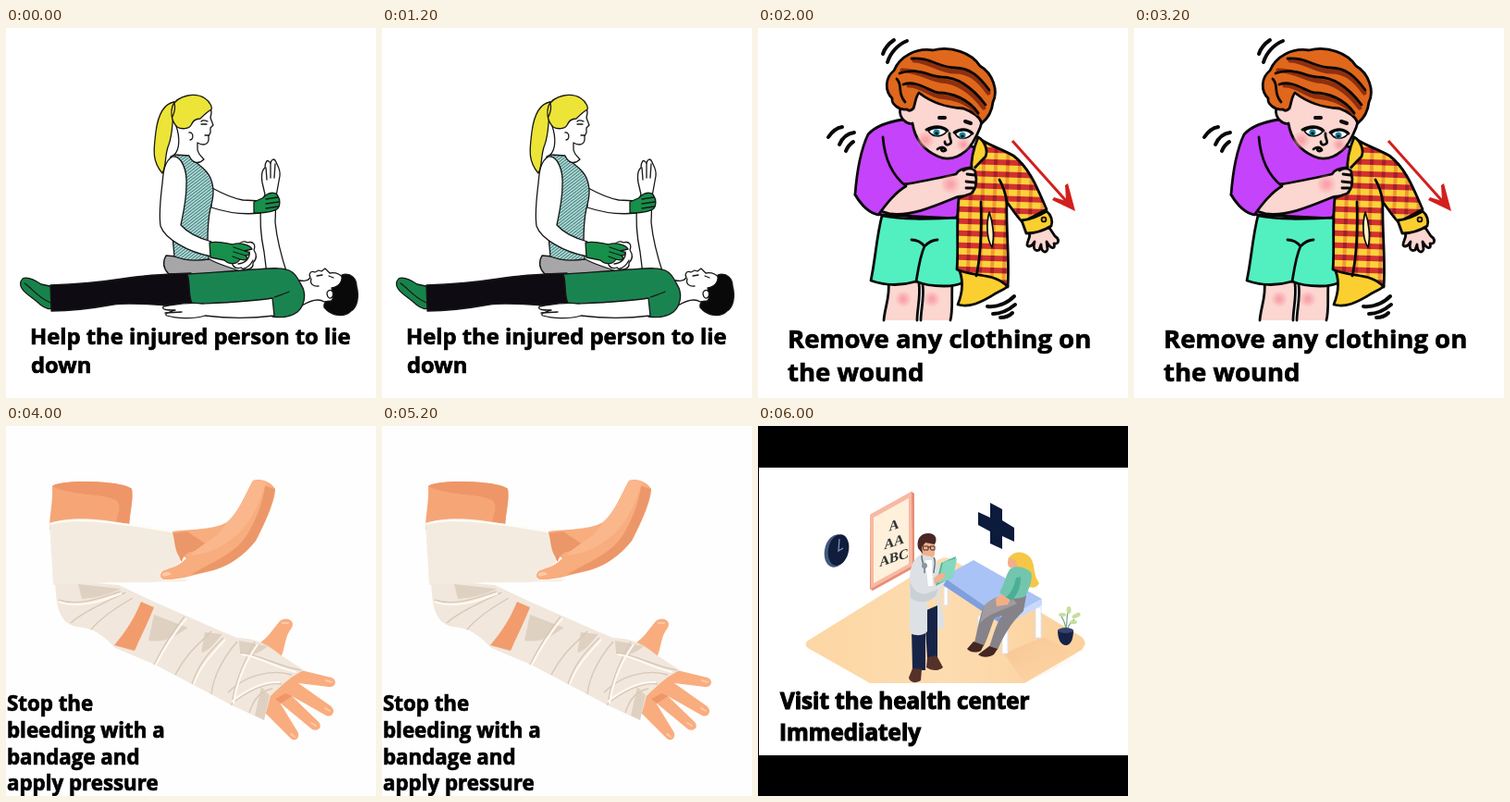
An HTML page that plays this animation: 400 by 400 pixels, repeating every 8 s.

```html
<!DOCTYPE html>
<html lang="en">
<head>
<meta charset="utf-8">
<title>First aid steps</title>
<style>
html, body { margin: 0; width: 100%; height: 100%; overflow: hidden; background: #fff; }
svg { display: block; width: 100vw; height: 100vh; }
text { font-family: "Open Sans", "Noto Sans", sans-serif; font-weight: 700; fill: #000; stroke: #000; stroke-width: .7; }
.heavy text { stroke-width: 1.1; }
.ink { stroke: #161616; stroke-width: 1.3; stroke-linejoin: round; stroke-linecap: round; }
.bold { stroke: #080808; stroke-width: 2.8; stroke-linejoin: round; stroke-linecap: round; }
.line { fill: none; }
.thin { stroke-width: 1.7; }
.thick { stroke-width: 4; }
.bare { stroke: none; }
.scene { display: none; }
.chart text { font-family: "Liberation Serif", "Noto Serif", serif; font-size: 15px; fill: #333; stroke: none; text-anchor: middle; }
</style>
</head>
<body>
<svg viewBox="0 0 400 400">
<defs>
  <pattern id="stripe" width="2.6" height="2.6" patternUnits="userSpaceOnUse" patternTransform="rotate(-38)">
    <rect width="2.6" height="2.6" fill="#cfe6e2"/><rect width="2.6" height="1.2" fill="#35817f"/>
  </pattern>
  <pattern id="plaid" width="13" height="13" patternUnits="userSpaceOnUse" patternTransform="rotate(2)">
    <rect width="13" height="13" fill="#fbd23a"/>
    <rect width="4" height="13" fill="#ee9a2f"/>
    <rect y="3" width="13" height="6" fill="#d3312f"/>
    <rect y="3" width="4" height="6" fill="#a31f2b"/>
  </pattern>
  <radialGradient id="blush"><stop offset=".2" stop-color="#f9a3aa"/><stop offset="1" stop-color="#f9a3aa" stop-opacity="0"/></radialGradient>
  <linearGradient id="floor" x1="0" y1="0" x2="1" y2="0">
    <stop offset="0" stop-color="#fdd6a3"/><stop offset=".5" stop-color="#fddcb0"/><stop offset="1" stop-color="#fbd09c"/>
  </linearGradient>
  <linearGradient id="shade" x1="0" y1="0" x2="1" y2=".6">
    <stop offset="0" stop-color="#f3b079"/><stop offset="1" stop-color="#f9c797" stop-opacity="0"/>
  </linearGradient>
</defs>

<!-- Lying down -->
<g class="scene">
  <g class="ink" fill="#fff">
    <path fill="#a6a6a8" d="M173 246C169 253 170 260 176 266H258C250 260 234 258 220 250Z"/>
    <path d="M221 172C232 178 244 184 256 186L276 187L275 200C258 202 240 200 222 194Z"/>
    <path fill="url(#stripe)" d="M178 139C186 134 194 134 199 138C204 147 216 150 221 162C226 174 224 184 221 195C218 208 218 220 218 232L219 250C206 252 192 251 182 247L174 160Z"/>
    <path fill="#ece436" d="M182 80C169 82 164 97 162 112C160 130 157 143 169 157C174 148 171 138 176 126C181 112 179 100 182 90Z"/>
    <path d="M200 76C214 74 222 84 222 92L221 97L224 105L221 108L221 113L219 117V121C218 127 212 127 207 124L207 128C206 134 210 138 214 142C208 148 201 146 198 138L182 137C188 131 188 118 184 106Z"/>
    <path fill="#ece436" d="M180 84C186 73 204 69 215 76C221 80 223 86 222 88C217 91 213 95 210 98C205 98 202 100 200 105C198 109 190 110 185 107C178 100 178 90 180 84Z"/>
    <path class="line" d="M181 80C184 84 182 92 180 96M198 113C203 112 203 121 199 121M211 104L217 104M211 101C213 99 216 100 218 101M215 116L219 116"/>
    <path d="M180 139C171 144 170 156 169 168C167 184 165 200 167 214C172 228 196 242 222 247L222 231C208 227 196 221 189 213C192 198 195 186 195 170C196 154 190 138 180 139Z"/>
    <path d="M276 190C274 208 276 228 279 242L282 266H304C298 248 293 230 291 210L292 182L296 160C297 153 294 150 292 145C290 140 287 142 286 146C282 140 280 146 280 151C276 154 276 162 277 167L280 180Z"/>
    <path class="line" d="M286 146L286 162M281 151L282 164M291 147L290 162"/>
    <path fill="#16904a" d="M268 188L277 184L282 180C287 177 293 178 294 182C297 186 296 192 294 195C288 200 280 199 274 200L268 200Z"/>
    <path class="line" d="M281 185L294 183M281 190L295 188M281 195L294 193"/>
    <path d="M249 238C253 230 258 230 261 232C268 230 270 235 268 240C272 246 270 251 267 254C268 261 258 263 254 259C245 262 242 252 246 248Z"/>
    <path class="line" d="M251 255C259 254 264 249 263 242M257 260C264 258 265 254 267 251"/>
    <path fill="#16904a" d="M220 232C231 230 238 233 245 234C253 231 264 235 266 239L258 241C264 242 265 245 259 246C263 250 259 252 253 250C249 257 240 255 236 251L221 248Z"/>
    <path class="line" d="M246 237L258 241M246 242L259 246M245 247L253 250"/>
  </g>
  <g class="ink" fill="#fff">
    <path fill="#17834b" d="M18 271C24 268 32 273 38 277L52 280L51 301C49 306 42 303 37 299C28 290 13 284 16 274Z"/>
    <path class="line" d="M20 276C29 282 34 291 48 297"/>
    <path fill="#0e0b12" d="M48 278C75 277 100 275 126 271C150 267 172 266 200 265L201 300C170 301 140 296 116 299C94 303 72 306 49 306Z"/>
    <path d="M308 272C318 272 324 276 329 270C327 266 329 262 334 264L338 262L341 263L345 260L350 265C356 264 361 266 364 270L362 294L344 296C338 292 330 294 320 300Z"/>
    <path fill="#090909" d="M363 267C373 264 379 271 379 279C382 290 380 302 373 306C366 313 352 312 344 302C343 297 347 294 351 296C355 293 354 287 352 281C358 280 364 276 363 267Z"/>
    <path d="M347 286C350 281 355 284 353 290C351 294 347 292 347 286Z"/>
    <path class="line" d="M336 268L342 267M349 268L354 270M330 271C328 277 333 280 338 279"/>
    <path fill="#1a8451" d="M196 266C222 264 246 263 268 261C284 260 300 258 308 263C315 267 316 273 321 281C324 289 323 300 315 307C306 314 295 313 288 312L286 296C258 296 230 302 202 299C196 290 200 277 196 266Z"/>
    <path d="M288 292C264 296 236 297 212 298C198 296 184 299 170 301C168 305 175 305 183 305C176 307 170 309 174 311C184 314 202 315 215 311C240 314 266 314 290 311Z"/>
    <path class="line" d="M172 308L190 307M290 291C298 288 302 287 306 285"/>
  </g>
  <g font-size="23.8"><text x="26" y="342">Help the injured person to lie</text><text x="27" y="373">down</text></g>
</g>

<!-- Taking the jacket off -->
<g class="scene">
  <g class="bold" fill="#fcd6d0">
    <path class="line thick" d="M147 13C141 17 137 22 135 28M161 14C151 18 143 27 140 37M76 118C80 112 85 108 91 107M88 126C91 119 97 114 104 113M95 133C97 128 100 125 103 123M248 301C258 302 269 298 277 290M254 309C264 309 272 304 278 299M262 313C268 313 272 311 275 308"/>
    <path class="bare" d="M141 273C143 288 137 302 136 316H172C172 303 176 290 174 273ZM178 273C180 290 176 304 176 316H208C212 300 209 288 211 272Z"/>
    <path class="line" d="M141 275C143 290 137 302 136 316M174 276C176 290 172 304 172 316M178 277C180 292 176 304 176 316M210 277C209 290 211 304 208 316"/>
    <path fill="#c543fa" d="M157 99C143 101 128 105 119 115C111 132 107 153 105 180C112 192 122 201 134 202L214 206L236 160L236 130Z"/>
    <path fill="#52efc0" d="M134 203C160 208 190 206 216 205L228 264C228 276 216 279 201 279C190 279 180 278 171 274C154 279 136 278 122 273C127 250 128 226 134 203Z"/>
    <path class="line" d="M166 229C171 229 176 231 180 236C175 247 173 262 171 274M180 236C184 232 190 229 194 229"/>
    <path d="M130 197C136 185 145 174 158 169C178 166 196 162 214 158C218 151 226 152 234 150L233 178C227 184 218 180 212 184C190 193 164 204 143 201Z"/>
    <path class="bare" fill="#c543fa" d="M105 180C112 192 121 200 130 202C139 190 148 178 160 171C151 162 143 148 142 129C132 142 118 170 105 180Z"/>
    <path class="line" d="M105 180C112 192 121 200 130 202C139 190 148 178 160 171M135 118C137 143 146 160 160 171"/>
    <path fill="#fbcf2f" d="M216 258C222 270 222 284 216 299C230 303 243 295 252 290C260 284 267 283 270 279L262 266Z"/>
    <path d="M292 219C297 224 290 231 291 235C294 238 297 234 299 231C297 238 299 242 304 240L306 234C306 243 312 244 313 239L312 231C317 240 322 239 320 233C326 234 326 228 321 225L315 216Z"/>
    <path fill="url(#plaid)" d="M238 119C250 127 264 131 276 138C294 151 303 176 312 196L286 210C280 204 275 196 269 188C268 218 272 248 270 280C256 264 234 270 215 261C217 236 214 210 217 184L232 178L232 148Z"/>
    <path class="line" d="M269 189C268 180 265 171 261 164M236 268C240 250 242 220 241 188"/>
    <path class="thin" fill="#fff3c7" d="M250 199C246 214 248 230 253 237C256 226 254 210 250 199Z"/>
    <path fill="#fbcf2f" d="M238 118C245 122 249 132 246 139C241 144 236 149 231 155C230 145 233 130 238 118Z"/>
    <path fill="#fbcf2f" d="M285 208C295 207 304 203 312 198C317 202 319 209 317 214C309 219 300 222 290 222Z"/>
    <circle class="thin" cx="309" cy="207" r="2.5" fill="#e8a51e"/>
    <path class="bare" d="M219 160C222 151 230 151 234 151C237 156 235 162 234 167C236 176 230 180 223 178C216 180 215 172 218 168Z"/>
    <path class="line" d="M222 154C228 150 236 152 235 158C237 164 236 174 231 178M226 158L234 159M225 166L234 167M225 173L232 173"/>
  </g>
  <g class="bold" fill="#fcd6d0">
    <path d="M162 80C152 78 151 94 158 100C161 103 164 104 167 103C170 122 181 133 195 139C208 145 223 138 232 124C238 114 243 104 243 94L218 58L166 59Z"/>
    <path fill="#e0671b" d="M161 88C152 89 144 82 145 76C137 68 137 54 147 46C153 31 171 21 189 24C209 19 231 27 240 41C254 49 260 68 254 80C253 90 248 98 242 103C239 94 230 90 222 87C204 86 188 81 174 70C170 75 170 82 168 87C165 90 163 90 161 88Z"/>
    <g class="line" style="stroke:#8e2f0e;stroke-width:5">
      <path d="M156 46C171 45 185 55 198 57C214 58 230 67 244 86M169 35C184 35 197 47 213 47C229 47 239 56 249 70M163 62C174 61 184 71 196 74C212 75 227 80 237 92"/>
    </g>
    <path class="line" d="M153 49C171 42 185 52 198 53C215 53 230 62 246 83M166 33C185 31 196 43 213 43C229 43 239 52 250 67M157 61C171 56 183 67 195 70C210 70 228 77 238 92M150 55C157 62 150 70 159 80"/>
    <path class="line thick" d="M196 97L202 97M224 101L230 103"/>
    <path class="thin" fill="#fff" d="M184 111C190 107 200 107 204 112C198 119 188 118 184 111ZM213 114C219 109 228 110 231 115C225 121 217 121 213 114Z"/>
    <path class="line" d="M182 110C190 105 200 106 205 111M212 113C219 108 227 109 232 114M207 114C206 120 212 124 206 126C203 127 202 125 202 123M194 131C198 128 202 129 203 132C200 134 197 133 199 129"/>
  </g>
  <g fill="#1887a5"><circle cx="193" cy="113" r="3.500"/><circle cx="221" cy="116" r="3.500"/></g>
  <g fill="#081620"><circle cx="193" cy="114" r="1.800"/><circle cx="221" cy="117" r="1.800"/></g>
  <g fill="url(#blush)">
    <circle cx="181" cy="121" r="10"/><circle cx="222" cy="126" r="8"/><circle cx="208" cy="169" r="11"/>
    <circle cx="157" cy="293" r="9"/><circle cx="188" cy="293" r="9"/>
  </g>
  <path d="M275 122L335 189" fill="none" stroke="#d2201d" stroke-width="3"/>
  <path d="M343 198L318 186L320 183L333 187L332 170L335 168Z" fill="#d2201d"/>
  <g font-size="27.5"><text x="32" y="346">Remove any clothing on</text><text x="32" y="382">the wound</text></g>
</g>

<!-- Bandaging -->
<g class="scene">
  <rect width="400" height="400" fill="#fefefe"/>
  <path fill="#f6a577" d="M50 65C60 57 126 59 136 68C138 80 134 91 133 109L47 112C47 96 51 81 50 65Z"/>
  <path fill="#ee9668" d="M50 65C60 57 126 59 136 68C138 80 134 91 133 109L119 108C119 96 127 87 119 80C102 72 71 76 50 65Z"/>
  <path fill="#f9ad7f" d="M268 238C280 234 288 220 296 211C304 205 313 211 309 218C300 229 303 240 296 252L319 264L352 272C359 275 356 283 349 282L316 278L350 302C358 307 353 316 346 313L309 292L336 318C344 324 338 331 331 328L296 299L315 330C319 336 313 343 307 337L276 306Z"/>
  <path fill="#ee9668" d="M309 292L302 289L291 295L297 300Z"/>
  <path fill="none" stroke="#ffc9a8" stroke-width="2" stroke-linecap="round" d="M346 275L352 277M345 305L350 308M330 321L335 324M308 333L312 336M299 213L305 213"/>
  <path fill="#f1e7dc" d="M53 166L122 172L160 190L233 222L250 229C270 229 286 238 296 247L322 264C309 270 298 280 286 292L279 318L244 302L220 289L161 258L118 240C104 225 94 218 76 217C59 213 54 199 53 166Z"/>
  <path fill="#f29c6d" d="M146 190L160 196C154 211 146 227 139 243L117 237C130 222 139 207 146 190Z"/>
  <path fill="#dfd1c1" d="M78 171L124 176C110 183 96 186 82 187ZM160 204L197 218C184 226 174 235 154 232ZM215 223L234 225C224 236 220 243 211 245ZM252 232L283 238C270 249 259 250 253 245ZM276 282L285 291L279 318L269 313Z"/>
  <path fill="none" stroke="#d8c8b7" stroke-width="1.4" d="M57 188C80 196 106 184 124 179M70 213C82 202 108 190 129 180M92 220C103 207 121 195 137 186M160 258C170 238 180 222 193 206M183 269C194 247 206 238 222 222M201 279C208 258 217 247 235 229M222 290C224 270 236 249 250 233M244 302C246 284 254 260 269 233M253 245C274 247 294 260 319 264M240 288C258 270 286 262 309 269M244 300C260 287 282 276 298 279M263 310C267 297 275 286 288 284"/>
  <path fill="none" stroke="#fffaf3" stroke-width="2" d="M57 190C80 198 107 188 125 181M162 258C172 239 181 224 195 208M203 279C210 260 221 248 237 231M246 300C249 280 258 256 272 236M255 247C274 249 292 262 314 266M244 298C260 285 278 276 296 277"/>
  <path fill="#f8ad7e" d="M267 59C275 56 286 60 291 68C291 82 280 105 270 124C258 139 242 151 224 156C207 160 186 167 171 166C164 163 168 157 176 154C185 152 191 147 195 143L181 134L180 114C201 111 222 113 239 104C253 92 258 74 267 59Z"/>
  <path fill="#ec9769" d="M291 68C289 83 280 105 270 124C258 139 242 151 224 156L200 161C219 148 247 140 261 117C270 102 278 83 280 65ZM180 116L196 114C205 121 218 126 220 134C206 136 194 132 190 147L181 134Z"/>
  <path fill="#fbb78c" d="M239 104C250 95 258 76 267 59C272 57 276 59 281 61C274 83 266 104 248 119C235 130 220 138 199 140C209 128 228 124 239 104Z"/>
  <path fill="#f4ebe0" d="M47 105C62 100 84 99 107 102L179 113C183 121 181 131 187 141C192 150 181 151 171 157C165 161 167 167 172 167L198 166C194 169 185 168 174 168C146 170 99 168 51 172Z"/>
  <path fill="none" stroke="#fffdf8" stroke-width="2" d="M48 106C70 99 102 101 179 114"/>
  <path fill="#f8ad7e" d="M197 143C190 151 181 153 171 156C164 160 167 167 174 166C190 165 204 159 214 151Z"/>
  <path fill="#ffc9a8" d="M169 160C173 156 178 158 179 160C175 162 171 163 169 162Z"/>
  <g font-size="22.3"><text x="1" y="308">Stop the</text><text x="1" y="337">bleeding with a</text><text x="1" y="365.500">bandage and</text><text x="1" y="394">apply pressure</text></g>
</g>

<!-- Health center -->
<g class="scene">
  <rect width="400" height="400"/>
  <rect x="1" y="45" width="399" height="311" fill="#fff"/>
  <path fill="url(#floor)" d="M54 232L196 144Q203 140 211 145L350 228Q357 234 350 242L288 278H121L54 240Q49 236 54 232Z"/>
  <path fill="url(#shade)" d="M266 246L309 228L350 250L288 278Z" opacity=".5"/>
  <path fill="#e78e77" d="M121 96L166 71L169 73V153L124 178L121 176Z"/>
  <path fill="#f8b9a3" d="M121 96L166 71L167 151L122 176Z"/>
  <path fill="#fff0dc" d="M125 99L163 78V149L125 170Z"/>
  <g class="chart"><text transform="translate(147 112) skewY(-18)">A</text><text transform="translate(147 130) skewY(-18)">AA</text><text transform="translate(147 147) skewY(-18)">ABC</text></g>
  <ellipse cx="84" cy="135" rx="12" ry="18" fill="#44577d" transform="rotate(12 84 135)"/>
  <ellipse cx="87" cy="134" rx="11" ry="17" fill="#101d3c" transform="rotate(12 87 134)"/>
  <path d="M88 122L87 135L92 132" fill="none" stroke="#7f91ba" stroke-width="1.3"/>
  <path fill="#0c1a3b" d="M251 83L264 90V102L277 110V125L264 119V133L251 127V114L238 107V93L251 99Z"/>
  <path fill="#fff" stroke="#d9e3f6" d="M201 174H205V194H201ZM264 208H270V246H264ZM300 196H306V229H300ZM238 205H242V228H238Z"/>
  <path fill="#a9c3f6" d="M200 163L233 145L307 187L266 209Z"/>
  <path fill="#7e9fe0" d="M200 163L266 209V216L200 172Z"/>
  <path fill="#c8d9fb" d="M266 209L307 187V194L266 216Z"/>
  <path fill="#858289" d="M270 181C260 184 250 188 244 195C239 208 237 222 234 234L244 238C249 228 252 216 256 207L264 205C257 214 254 228 250 239L259 242C265 228 273 213 287 200L290 183Z"/>
  <path fill="#a19ba0" d="M270 181C260 184 250 188 244 195L240 214C247 203 264 200 280 192Z"/>
  <path fill="#442723" d="M233 233L244 237L241 243C235 246 228 244 226 241ZM250 238L259 241L255 247C249 251 241 250 238 247Z"/>
  <path fill="#f6c746" d="M272 142C277 134 289 135 295 143C300 151 297 160 304 170C300 178 290 175 286 167Z"/>
  <path fill="#f3ae88" d="M271 142C270 146 269 150 272 153L277 153V158H285L286 141ZM257 187C262 181 268 181 274 186L270 193L258 195Z"/>
  <path fill="#f6c746" d="M271 143C276 135 289 136 293 145C295 154 292 160 286 160C279 156 281 148 278 145C276 143 273 144 271 143Z"/>
  <path fill="#72c6ae" d="M273 154C268 160 266 172 261 180L268 185C273 187 284 187 289 184C293 177 298 164 295 158C289 152 279 151 273 154Z"/>
  <path fill="#4cae96" d="M284 163C284 174 281 182 274 189L268 185C274 181 277 173 279 164Z"/>
  <path fill="#172448" d="M166 220H181V264H167ZM180 200L194 194V250L183 252Z"/>
  <path fill="#55312a" d="M183 250L193 248L200 261C194 266 187 264 182 261ZM167 262L177 263L176 275C170 279 164 277 163 272Z"/>
  <path fill="#f2b08c" d="M174 126H191V139C188 146 181 145 177 140Z"/>
  <path fill="#4a2724" d="M173 132C171 122 176 116 184 116C193 116 194 123 191 128L181 126L177 131L178 138Z"/>
  <path fill="none" stroke="#3b2d2f" stroke-width="1" d="M178 130H184V134H179ZM186 130H191V134H187ZM184 131H186"/>
  <path fill="#dde1e5" d="M176 139C167 144 164 154 164 166V224C173 228 180 226 183 222L183 190L194 184V220L200 219C204 207 196 194 196 179L204 166L198 157L191 142Z"/>
  <path fill="#cbd0d7" d="M164 168C171 184 179 184 195 176L192 184C180 194 171 190 165 186Z"/>
  <path fill="#fff" d="M181 145L188 145L189 173L184 173Z"/>
  <path fill="none" stroke="#69737d" stroke-width="1.5" d="M177 140C177 149 181 151 180 159M190 142C193 147 190 153 190 159"/>
  <circle cx="180" cy="151" r="3" fill="#8b96a0"/>
  <path fill="#51b69c" d="M198 148L214 141L209 164L192 173Z"/>
  <path fill="#86d7bf" d="M200 147L215 143L211 164L195 170Z"/>
  <path fill="#f2b08c" d="M190 165C197 157 202 158 203 162L198 167L191 171Z"/>
  <path fill="none" stroke="#7fa98e" stroke-width="1.3" d="M333 222C333 212 329 208 327 204M333 222C334 212 334 205 335 201M334 222C335 214 340 211 342 209"/>
  <g fill="#c7de9c"><ellipse cx="329" cy="204" rx="4" ry="2"/><ellipse cx="336" cy="199" rx="2.500" ry="4"/><ellipse cx="344" cy="205" rx="5" ry="2.300" transform="rotate(-25 344 205)"/><ellipse cx="341" cy="212" rx="4" ry="2"/></g>
  <path fill="#162247" d="M324 221H341C341 230 338 237 333 237C327 237 324 230 324 221Z"/>
  <ellipse cx="332.500" cy="221" rx="8.500" ry="3" fill="#33446e"/>
  <g class="heavy" font-size="24.2"><text x="24" y="306">Visit the health center</text><text x="23" y="340">Immediately</text></g>
</g>
</svg>
<script>
const HOLD = 2000;
const scenes = [...document.querySelectorAll('.scene')];
const start = performance.now();

function draw(time) {
  const current = Math.floor(time / HOLD) % scenes.length;
  scenes.forEach((scene, i) => { scene.style.display = i === current ? 'inline' : 'none'; });
}

function tick() {
  draw(performance.now() - start);
  requestAnimationFrame(tick);
}
tick();
</script>
</body>
</html>
```
